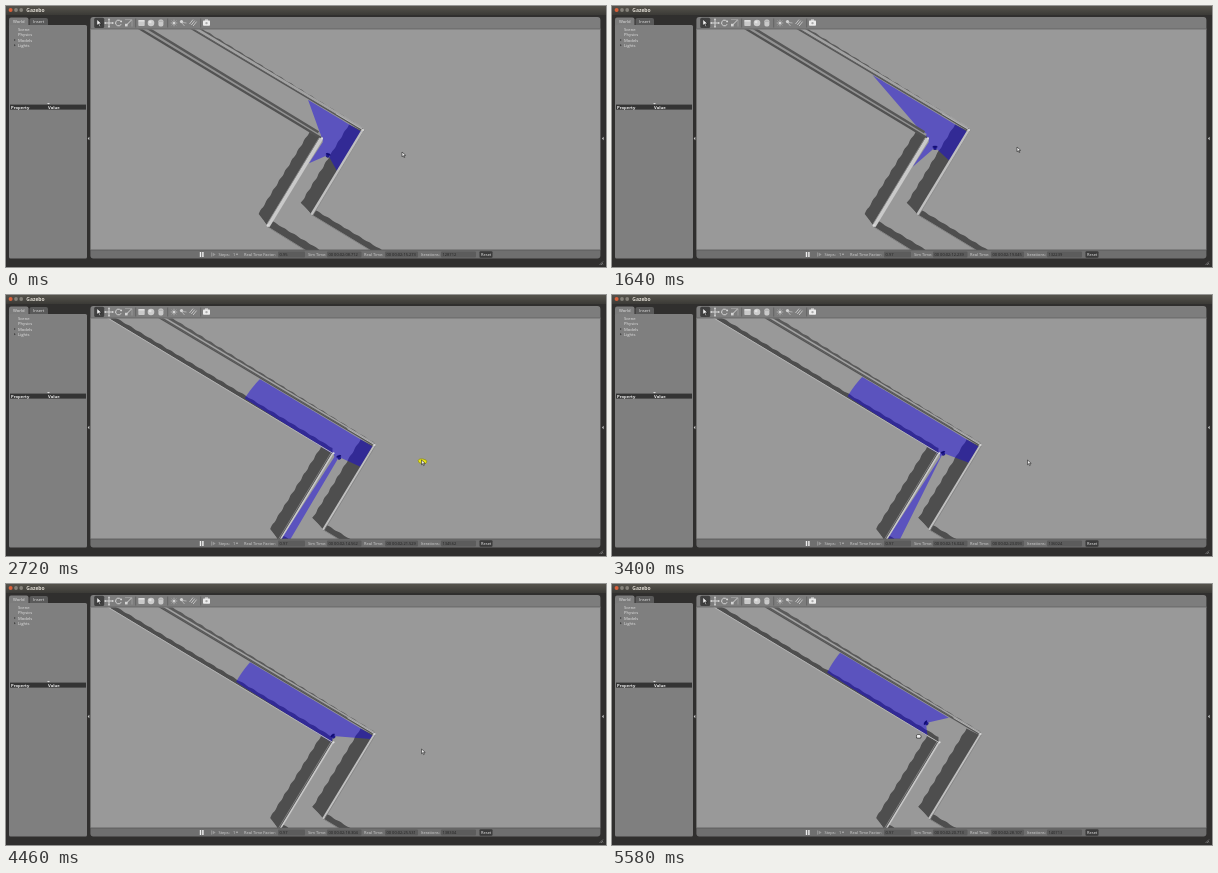
Animation, 600 px wide and 261 px high, one loop 5600 ms. Source, as an HTML page with a canvas:

```html
<!DOCTYPE html>
<html lang="en">
<head>
<meta charset="utf-8">
<title>Gazebo</title>
<style>
html, body { margin: 0; width: 100%; height: 100%; overflow: hidden; background: #33322f; }
canvas { display: block; width: 600px; height: 261px; }
</style>
</head>
<body>
<canvas id="stage"></canvas>
<script>
const W = 600, H = 261, LOOP = 5600;
const canvas = document.getElementById('stage');
const ctx = canvas.getContext('2d');
const dpr = window.devicePixelRatio || 1;
canvas.width = W * dpr;
canvas.height = H * dpr;

const clamp = (v, a, b) => Math.max(a, Math.min(b, v));
const lerp = (a, b, k) => a + (b - a) * k;
const ramp = (t, a, b) => clamp((t - a) / (b - a), 0, 1);
const smooth = k => k * k * (3 - 2 * k);

// robot pose: time, x, y, right edge of the scan in degrees
const POSE = [
  [0, 322, 149, 60.6],
  [1640, 323, 141.5, 43],
  [2240, 323, 139, 31.4],
  [2720, 321.5, 136, 24.6],
  [3400, 319.5, 132, 20.5],
  [4460, 315.5, 126, 4.5],
  [5580, 302.5, 113, -13]
];
const FOV = 264, RANGE = 111, RAD = Math.PI / 180;
const PAN = [11.5, 26];

// faces that stop the laser
const OUTER = [[100, -27.2], [355, 125.5], [306, 207], [386, 255]];
const INNER = [[93.5, -7], [316.5, 134], [316.8, 136], [263.5, 218], [324, 255]];

function slope(i, c) {
  const a = POSE[Math.max(i - 1, 0)], b = POSE[Math.min(i + 1, POSE.length - 1)];
  return (b[c] - a[c]) / (b[0] - a[0]);
}

function pose(t, c) {
  let i = 0;
  while (i < POSE.length - 2 && t > POSE[i + 1][0]) i++;
  const a = POSE[i], b = POSE[i + 1], h = b[0] - a[0], k = (t - a[0]) / h;
  return lerp(a[c], b[c], smooth(k)) +
    h * k * (1 - k) * ((1 - k) * slope(i, c) - k * slope(i + 1, c));
}

function hit(x, y, dx, dy) {
  let best = RANGE;
  for (const chain of [OUTER, INNER]) {
    for (let i = 0; i + 1 < chain.length; i++) {
      const [ax, ay] = chain[i];
      const ex = chain[i + 1][0] - ax, ey = chain[i + 1][1] - ay;
      const det = dx * ey - dy * ex;
      if (Math.abs(det) < 1e-9) continue;
      const d = ((ax - x) * ey - (ay - y) * ex) / det;
      const u = ((ax - x) * dy - (ay - y) * dx) / det;
      if (d > 0 && d < best && u >= 0 && u <= 1) best = d;
    }
  }
  return best;
}

function poly(pts, fill) {
  ctx.beginPath();
  pts.forEach(p => ctx.lineTo(p[0], p[1]));
  ctx.closePath();
  ctx.fillStyle = fill;
  ctx.fill();
}

function line(x1, y1, x2, y2, color, w) {
  ctx.beginPath();
  ctx.moveTo(x1, y1);
  ctx.lineTo(x2, y2);
  ctx.strokeStyle = color;
  ctx.lineWidth = w;
  ctx.stroke();
}

function rect(x, y, w, h, color) {
  ctx.fillStyle = color;
  ctx.fillRect(x, y, w, h);
}

function round(x, y, w, h, r, color) {
  ctx.beginPath();
  ctx.roundRect(x, y, w, h, r);
  ctx.fillStyle = color;
  ctx.fill();
}

function disc(x, y, r, color) {
  ctx.beginPath();
  ctx.arc(x, y, r, 0, 2 * Math.PI);
  ctx.fillStyle = color;
  ctx.fill();
}

function ring(x, y, r, color, w) {
  ctx.beginPath();
  ctx.arc(x, y, r, 0.4, 5.9);
  ctx.strokeStyle = color;
  ctx.lineWidth = w;
  ctx.stroke();
}

function text(s, x, y, size, color, weight = '') {
  ctx.font = `${weight} ${size}px "Open Sans", sans-serif`;
  ctx.fillStyle = color;
  ctx.fillText(s, x, y);
}

// ragged edge of a shadow
function ragged(x1, y1, x2, y2, amp) {
  const len = Math.hypot(x2 - x1, y2 - y1), n = Math.ceil(len / 2), pts = [];
  for (let i = 0; i <= n; i++) {
    const k = i / n, s = amp * Math.sin(k * len / 1.9);
    pts.push([lerp(x1, x2, k) + s * (y2 - y1) / len, lerp(y1, y2, k) - s * (x2 - x1) / len]);
  }
  return pts;
}

function shadows(p) {
  const dark = '#4e4e4e';
  poly([[315, 132], ...ragged(303.5, 126, 252.5, 208, 0.4), [262, 220]], dark);
  poly([[356, 125], ...ragged(343, 118.5, 295, 197, 0.4), [306, 208]], dark);
  poly([[262, 221], [256, 211], ...ragged(266, 215, 334, 256, 0.3), [318, 256]], dark);
  poly([[306, 209], [298, 199], ...ragged(310, 204.5, 394, 255, 0.3), [384, 256]], dark);
  const up = lerp(1, 5, p);
  poly([[93, -1.5], [315, 132], ...ragged(315, 132 - up, 93, -1.5 - up, 0.3)], dark);
}

function laser(x, y, right) {
  const pts = [[x, y]];
  for (let a = 0; a <= FOV; a += 0.25) {
    const r = (right - a) * RAD, dx = Math.cos(r), dy = Math.sin(r);
    const d = hit(x, y, dx, dy);
    pts.push([x + dx * d, y + dy * d]);
  }
  poly(pts, 'rgba(18,0,234,0.46)');
}

function robot(x, y, heading) {
  ctx.save();
  ctx.translate(x, y);
  ctx.rotate(heading * RAD);
  rect(-2.4, -1.6, 4.2, 3.2, '#1b1592');
  rect(0, -2.4, 1.3, 4.8, '#120d6c');
  rect(-2.6, -0.7, 1.2, 1.4, '#2a2478');
  ctx.restore();
}

function walls(p) {
  // inner passage, long side: the tall face slides out of sight as the view pans
  ctx.globalAlpha = 1 - p;
  line(70, -18.6, 314, 129.2, '#929292', 3);
  line(70, -21.5, 312.5, 126.2, '#575757', 2.5);
  line(70, -15.6, 315, 132, '#525252', 2.2);
  ctx.globalAlpha = p;
  line(70, -15.2, 315, 132.2, '#b4b4b4', 1);
  ctx.globalAlpha = 1;
  // outer passage, long side
  const top = ragged(100, -36.5, 356.5, 121.5, 0.3);
  poly([[100, -28.5], ...top, [357, 124.5]], '#5a5a5a');
  line(100, -31.3, 356.5, 122.4, '#a2a2a2', lerp(2.6, 1.6, p));
  line(100, -28, 355, 123.8, '#555', 1.3);
  line(330, 107.6, 357, 123.7, '#b4b4b4', 1);
  // short sides
  const w = lerp(3.8, 1.5, p);
  line(315.3, 132.5, 262, 220, '#c9c9c9', w);
  line(313.6 - w / 6, 132, 260.5, 219, '#8a8a8a', 0.8);
  line(357, 124, 306, 208, '#bfbfbf', lerp(2.8, 2, p));
  line(358.2, 124.2, 307, 209, '#777', 0.6);
  disc(316, 132.3, 1.1, '#ddd');
  disc(357, 124, 1.1, '#d5d5d5');
  // lower ends
  line(261, 220.4, 320, 257, '#858585', 1);
  line(305.4, 208.6, 384, 256.2, '#858585', 1);
  disc(262, 219.6, 1.4, '#d8d8d8');
  disc(306, 208, 1, '#c4c4c4');
}

function arrow(x, y, s, fill, edge) {
  ctx.beginPath();
  [[0, 0], [0, 5], [1.3, 3.9], [2.2, 5.9], [3, 5.5], [2.2, 3.6], [3.9, 3.5]]
    .forEach(q => ctx.lineTo(x + q[0] * s, y + q[1] * s));
  ctx.closePath();
  ctx.fillStyle = fill;
  ctx.fill();
  ctx.strokeStyle = edge;
  ctx.lineWidth = 0.6;
  ctx.stroke();
}

function pointer(t, p) {
  const k = smooth(ramp(t, 300, 700)), out = smooth(ramp(t, 5260, 5540));
  const x = lerp(lerp(396, 405, k) + 10.5 * p, 304.5, out);
  const y = lerp(lerp(146, 141, k) + 24 * p, 151, out);
  if (t > 2390 && t < 2760) {
    ctx.beginPath();
    ctx.ellipse(x + 1, y + 1.3, 4.4, 2.4, 0.15, 0, 2 * Math.PI);
    ctx.fillStyle = '#e8e317';
    ctx.fill();
    ctx.strokeStyle = '#8c8a16';
    ctx.lineWidth = 0.7;
    ctx.stroke();
  }
  if (out < 1) return arrow(x, y, 0.95, '#f2f2f2', '#222');
  round(x - 0.5, y - 0.6, 5.4, 4, 1.5, '#333');
  round(x + 0.2, y, 4, 2.8, 1, '#f0f0f0');
}

function view(t) {
  const p = smooth(ramp(t, 2400, 2670));
  ctx.save();
  ctx.beginPath();
  ctx.rect(84.4, 23, 510, 221);
  ctx.clip();
  rect(84, 23, 511, 221, '#999');
  ctx.save();
  ctx.translate(PAN[0] * p, PAN[1] * p);
  const x = pose(t, 1), y = pose(t, 2), right = pose(t, 3);
  shadows(p);
  laser(x, y, right);
  walls(p);
  robot(x, y, right - FOV / 2);
  ctx.restore();
  pointer(t, p);
  ctx.restore();
}

function titleBar() {
  const g = ctx.createLinearGradient(0, 0, 0, 9);
  g.addColorStop(0, '#55534c');
  g.addColorStop(1, '#3b3a36');
  rect(0, 0, W, 9, g);
  disc(4.6, 4, 2, '#d9603a');
  disc(10, 4, 1.9, '#85827a');
  disc(15.2, 4, 1.9, '#85827a');
  text('Gazebo', 20.3, 6.2, 5, '#dfdbd2', 'bold');
}

function sidePanel() {
  round(3, 11.5, 19.5, 9, [2, 2, 0, 0], '#7c7c7c');
  round(23.5, 12, 18.5, 7, [2, 2, 0, 0], '#5a5a5a');
  text('World', 7, 16.8, 4.2, '#e6e6e6');
  text('Insert', 27, 16.8, 4.2, '#e6e6e6');
  round(3, 19, 78, 233.5, 1.5, '#7f7f7f');
  ['Scene', 'Physics', 'Models', 'Lights'].forEach((s, i) => {
    const y = 25.2 + i * 5.2;
    text(s, 12, y, 4.2, '#e4e4e4');
    if (i > 1) poly([[8, y - 2.7], [9.8, y - 1.6], [8, y - 0.5]], '#444');
  });
  poly([[41, 97], [44, 97], [42.5, 98.4]], '#ddd');
  rect(4, 98.6, 76, 5, '#343434');
  text('Property', 5, 102.6, 4.2, '#eee', 'bold');
  text('Value', 42, 102.6, 4.2, '#eee', 'bold');
  poly([[83.3, 130.8], [83.3, 134.2], [81.7, 132.5]], '#ccc');
  poly([[597.6, 130.8], [597.6, 134.2], [596, 132.5]], '#ccc');
}

function toolBar() {
  round(84.4, 11, 510, 12.5, [3, 3, 0, 0], '#7d7d7d');
  rect(84.4, 22.4, 510, 0.8, '#6a6a6a');
  const lite = '#d4d4d4';
  round(88.2, 11.8, 10, 10.2, 1.5, '#404040');
  arrow(90.8, 13.3, 1.25, '#f4f4f4', '#111');
  line(99.5, 17, 106.5, 17, lite, 1);
  line(103, 13.5, 103, 20.5, lite, 1);
  [[99.3, 17], [106.7, 17], [103, 13.3], [103, 20.7]].forEach(q => disc(q[0], q[1], 0.9, lite));
  ring(112.5, 17, 2.9, lite, 1);
  disc(115.2, 15.4, 0.9, lite);
  line(119.5, 20, 125.5, 14, lite, 1);
  rect(119, 17.8, 2.6, 2.6, lite);
  line(119, 13.6, 126, 13.6, '#b0b0b0', 0.6);
  line(126, 13.6, 126, 20.5, '#b0b0b0', 0.6);
  [129.5, 161.5, 194.5].forEach(x => rect(x, 12.5, 0.6, 9, '#555'));
  round(132.3, 13.9, 6.4, 6.2, 0.8, '#c9c9c9');
  rect(132.6, 14.1, 5.8, 1.5, '#e2e2e2');
  disc(145, 17, 3.3, '#cdcdcd');
  disc(144.2, 16, 1.3, '#e4e4e4');
  round(152.4, 13.6, 5, 6.8, 1.7, '#c9c9c9');
  line(153, 15.2, 156.8, 15.2, '#999', 0.6);
  disc(168, 17, 1.5, lite);
  for (let i = 0; i < 8; i++) {
    const c = Math.cos(i * Math.PI / 4), s = Math.sin(i * Math.PI / 4);
    line(168 + c * 2, 17 + s * 2, 168 + c * 3.3, 17 + s * 3.3, lite, 0.5);
  }
  disc(175.5, 15.6, 1.6, lite);
  line(176.5, 16.5, 180.5, 17, lite, 0.6);
  line(176, 17, 178.5, 20, lite, 0.6);
  for (let i = 0; i < 3; i++) line(183.5 + i * 1.8, 18 + i, 187 + i * 1.8, 13.6 + i, lite, 0.8);
  round(197, 14.4, 7, 5.4, 0.8, '#ececec');
  rect(199, 13.5, 3, 1.2, '#ececec');
  disc(200.5, 17.1, 1.2, '#aaa');
}

function clock(ms) {
  const pad = (n, l = 2) => String(n).padStart(l, '0');
  const s = Math.floor(ms / 1000);
  return `00 00:${pad(Math.floor(s / 60))}:${pad(s % 60)}.${pad(ms % 1000, 3)}`;
}

function statusBar(t) {
  round(84.4, 244, 510, 8.6, [0, 0, 3, 3], '#6f6f6f');
  rect(84.4, 243.6, 510, 0.8, '#565656');
  rect(193.8, 246, 1.4, 5, '#eee');
  rect(196.2, 246, 1.4, 5, '#eee');
  poly([[206.6, 246.4], [209.6, 248.5], [206.6, 250.6]], '#999');
  rect(205, 246.4, 0.8, 4.2, '#999');
  const sim = 128710 + Math.floor(t * 2.1508);
  const real = 135271 + Math.floor(t * 2.3);
  const label = '#d2d2d2', y = 250;
  const field = (x, w, s) => {
    round(x, 245.5, w, 6, 1, '#5c5c5c');
    text(s, x + 1.5, y, 4, '#222');
  };
  text('Steps:', 212.5, y, 4, label);
  text('1', 227, y, 4, label);
  poly([[230, 247.8], [232, 247.8], [231, 249.2]], label);
  text('Real Time Factor:', 238, y, 4, label);
  field(272, 27, t < 600 ? '0.95' : '0.97');
  text('Sim Time:', 302, y, 4, label);
  field(321, 34.5, clock(sim));
  text('Real Time:', 358, y, 4, label);
  field(379, 33, clock(real));
  text('Iterations:', 415, y, 4, label);
  field(435, 35, String(sim));
  round(473.5, 245.3, 13, 6.4, 1, '#3b3b3b');
  text('Reset', 475, y, 4, '#eee');
}

function draw(now) {
  const t = now % LOOP;
  ctx.setTransform(dpr, 0, 0, dpr, 0, 0);
  rect(0, 0, W, H, '#302f2e');
  titleBar();
  sidePanel();
  view(t);
  toolBar();
  statusBar(t);
  for (let i = 0; i < 3; i++) line(593.5 + i * 1.5, 259, 597, 255.5 + i * 1.5, '#999', 0.6);
}

const start = performance.now();
function tick() {
  draw(Math.max(0, performance.now() - start));
  requestAnimationFrame(tick);
}
tick();
</script>
</body>
</html>
```
